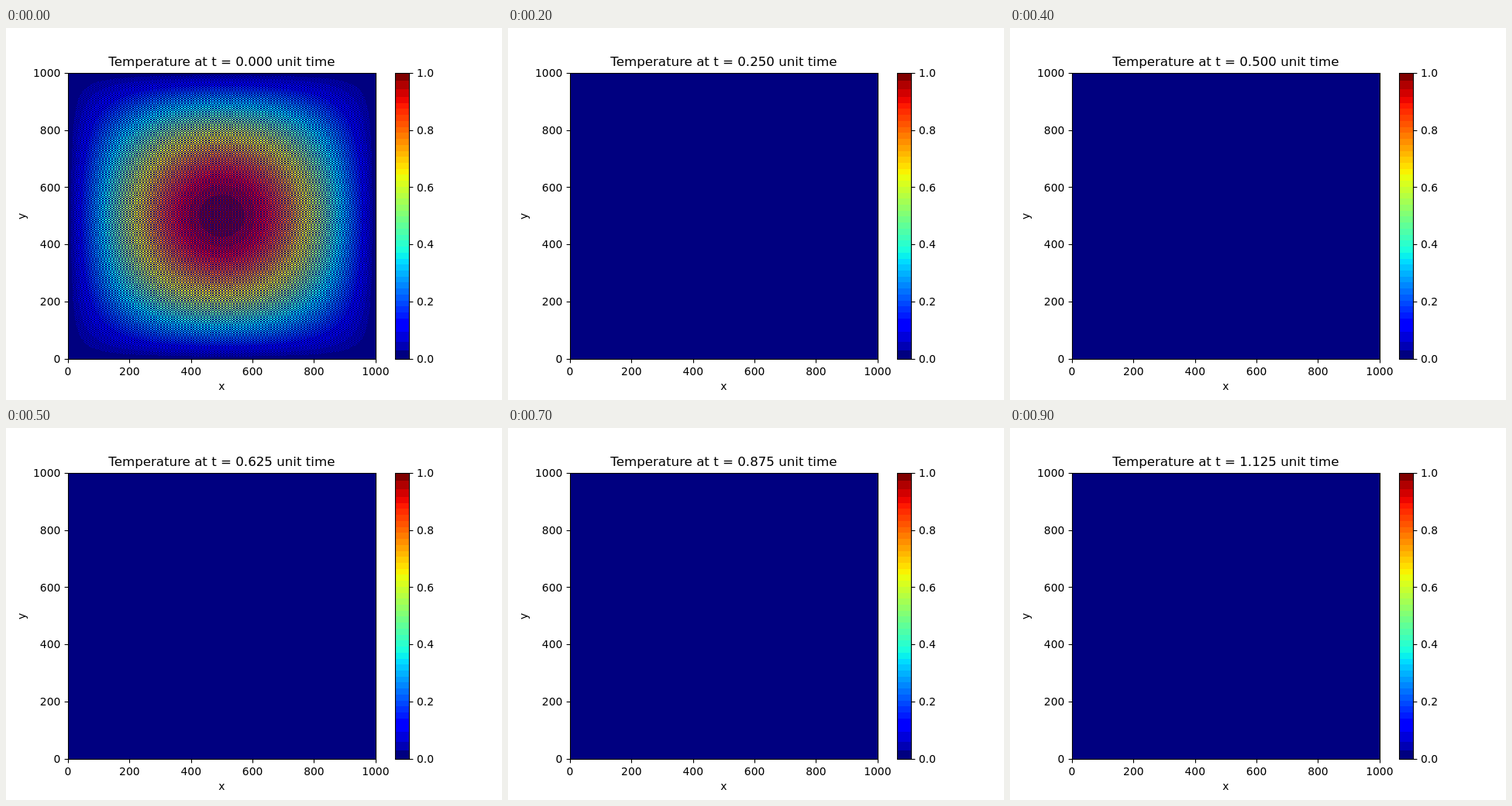
An HTML page with a canvas that plays this animation: 640 px wide and 480 px high, repeating every 1 s.

```html
<!DOCTYPE html>
<html lang="en">
<head>
<meta charset="utf-8">
<title>Temperature</title>
<style>
html, body { margin: 0; width: 640px; height: 480px; overflow: hidden; background: #fff; }
canvas { display: block; }
</style>
</head>
<body>
<canvas id="stage" width="640" height="480"></canvas>
<script>
const ctx = document.getElementById('stage').getContext('2d');
const LEFT = 80, RIGHT = 476.8, TOP = 57.6, BOTTOM = 427.2;
const W = RIGHT - LEFT, H = BOTTOM - TOP, N = 1000;
const BAR_L = 501.6, BAR_R = 520.08;
const snap = v => Math.floor(v + 0.5) + 0.5;

// Jet colour map: piecewise linear channels
const clamp = v => Math.max(0, Math.min(1, v));
const ramp = (v, a, b) => clamp((v - a) / (b - a));
function jet(v) {
  const r = v < 0.7 ? ramp(v, 0.35, 0.66) : 1 - 0.5 * ramp(v, 0.89, 1);
  const g = v < 0.5 ? ramp(v, 0.125, 0.375) : 1 - ramp(v, 0.64, 0.91);
  const b = v < 0.2 ? 0.5 + 0.5 * ramp(v, 0, 0.11) : 1 - ramp(v, 0.34, 0.65);
  return [r, g, b].map(c => Math.round(c * 255));
}

// The scale has wider steps at its dark ends
const edges = [0, 0.03, 0.061, 0.095];
for (let i = 0; i <= 36; i++) edges.push(0.142 + i * 0.752 / 36);
edges.push(0.915, 0.943, 0.973, 1);
const last = edges.length - 2;
const colours = edges.slice(0, -1).map((e, i) =>
  jet(i === 0 ? 0 : i === last ? 1 : (e + edges[i + 1]) / 2));
function colourOf(v) {
  let i = 0;
  while (i < last && v >= edges[i + 1]) i++;
  return colours[i];
}

// Highest grid mode: a sine dome whose sign alternates from cell to cell
function makeField() {
  const field = document.createElement('canvas');
  field.width = 397;
  field.height = 369;
  const fc = field.getContext('2d');
  const img = fc.createImageData(397, 369);
  for (let y = 0, k = 0; y < 369; y++) {
    const j = Math.floor((BOTTOM - 58.5 - y) / H * N);
    for (let x = 0; x < 397; x++, k += 4) {
      const i = Math.floor((x + 0.5) / W * N);
      const dome = Math.sin(Math.PI * i / (N - 1)) * Math.sin(Math.PI * j / (N - 1));
      img.data.set([...colourOf((i + j) % 2 ? 0 : dome), 255], k);
    }
  }
  fc.putImageData(img, 0, 0);
  return field;
}
const field = makeField();

function text(str, x, y, align, size = 13.89) {
  ctx.font = size + 'px "DejaVu Sans", sans-serif';
  ctx.textAlign = align;
  ctx.fillText(str, x, y);
}

function line(x1, y1, x2, y2) {
  ctx.beginPath();
  ctx.moveTo(x1, y1);
  ctx.lineTo(x2, y2);
  ctx.stroke();
}

function box(l, r) {
  ctx.strokeRect(snap(l), 58.5, snap(r) - snap(l), 369);
}

function drawBar() {
  colours.forEach((c, i) => {
    const y = Math.round(BOTTOM - edges[i + 1] * H);
    ctx.fillStyle = `rgb(${c})`;
    ctx.fillRect(502, y, 18, Math.round(BOTTOM - edges[i] * H) - y);
  });
}

function draw(step) {
  ctx.fillStyle = '#fff';
  ctx.fillRect(0, 0, 640, 480);
  if (step === 0) ctx.drawImage(field, 80, 58);
  else {
    ctx.fillStyle = '#000080';
    ctx.fillRect(80, 58, 397, 369);
  }
  drawBar();

  ctx.fillStyle = ctx.strokeStyle = '#000';
  ctx.lineWidth = 1.11;
  box(LEFT, RIGHT);
  box(BAR_L, BAR_R);
  for (let i = 0; i <= 5; i++) {
    const x = LEFT + W * i / 5, y = BOTTOM - H * i / 5;
    const tx = snap(x), ty = snap(y), base = Math.round(y + 5.1);
    line(tx, 427.5, tx, 432.4);
    line(75.6, ty, 80.5, ty);
    line(520.5, ty, 525.4, ty);
    text(i * 200, x, 448, 'center');
    text(i * 200, 70.3, base, 'right');
    text((i / 5).toFixed(1), 530, base, 'left');
  }
  text('x', 278.4, 467, 'center');
  ctx.save();
  ctx.translate(25, 243);
  ctx.rotate(-Math.PI / 2);
  text('y', 0, 0, 'center');
  ctx.restore();
  text(`Temperature at t = ${(step * 0.125).toFixed(3)} unit time`, 278.4, 49, 'center', 16.67);
}

let shown = -1;
const start = performance.now();
function tick(now) {
  const step = Math.floor(Math.max(0, now - start) % 1000 / 100);
  if (step !== shown) draw(shown = step);
  requestAnimationFrame(tick);
}
tick(start);
</script>
</body>
</html>
```
